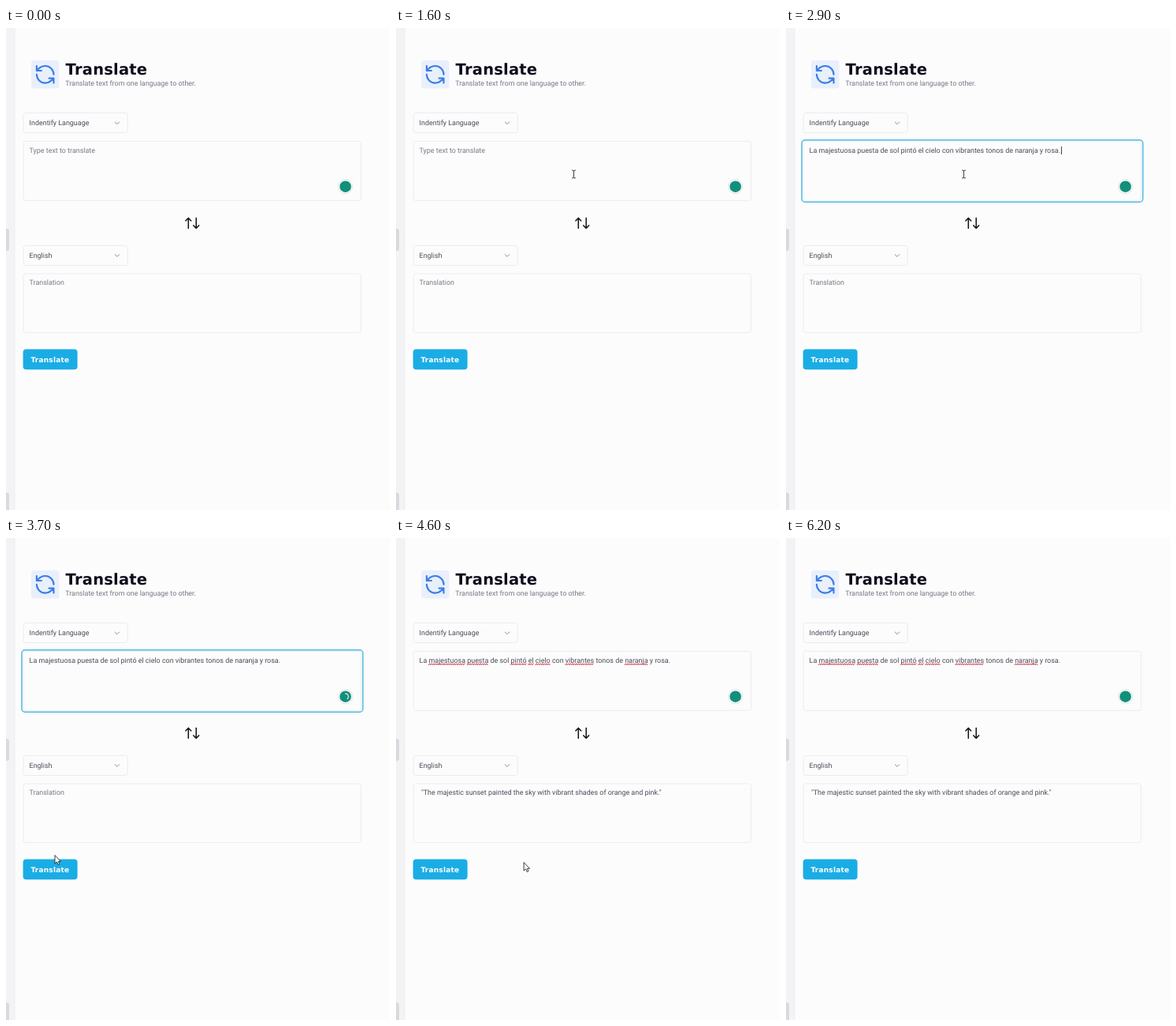
An HTML page that plays this animation: 487 by 610 pixels, repeating every 6300 ms.

```html
<!DOCTYPE html>
<html lang="en">
<head>
<meta charset="utf-8">
<title>Translate</title>
<style>
  html, body { margin: 0; width: 100%; height: 100%; overflow: hidden; background: #fcfcfd; }
  svg { display: block; width: 487px; height: 610px; }
  text { font: 8.93px Roboto, sans-serif; fill: #4b4c57; text-rendering: geometricPrecision; white-space: pre; }
  .muted { fill: #777983; }
  .wide { font-family: "DejaVu Sans", sans-serif; font-weight: bold; }
  .title { font-size: 19.5px; letter-spacing: .2px; fill: #0c0c1c; }
  .label { font-size: 9px; letter-spacing: .2px; fill: #fff; }
  .line { fill: none; stroke-linecap: round; stroke-linejoin: round; }
  .field { fill: #fcfcfd; stroke: #ebebee; stroke-width: .9; }
</style>
</head>
<body>
<svg viewBox="0 0 487 610">
  <rect width="487" height="610" fill="#fcfcfd"/>
  <rect width="11" height="610" fill="#f3f3f6"/>
  <path d="M11 0V610" stroke="#ececf0" stroke-width=".8"/>
  <rect x="-6" y="254" width="10" height="28" rx="3" fill="#d9d9de"/>
  <rect x="-6" y="588" width="10" height="30" rx="3" fill="#d9d9de"/>

  <rect x="32" y="41" width="35.5" height="35.5" rx="3.5" fill="#e9f0fc"/>
  <g class="line" transform="translate(49.7 58.8) scale(1.2)" stroke="#3c7ee8" stroke-width="1.8">
    <path id="half" d="M9 0A9 9 0 0 0 0 -9A9.75 9.75 0 0 0 -6.74 -6.26L-9 -4M-9 -9V-4H-4"/>
    <use href="#half" transform="rotate(180)"/>
  </g>
  <text class="wide title" x="75.6" y="59.4">Translate</text>
  <text class="muted" x="75.2" y="73">Translate text from one language to other.</text>

  <rect class="field" x="22" y="107.5" width="132.3" height="25" rx="3"/>
  <text x="29.6" y="123">Indentify Language</text>
  <rect class="field" x="22" y="275.5" width="132.3" height="25" rx="3"/>
  <text x="29.6" y="290.5">English</text>
  <path class="line" d="M138.3 119L141 121.7L143.7 119M138.3 286.7L141 289.4L143.7 286.7" stroke="#8b8c95"/>

  <rect class="field" x="22" y="143.3" width="428.3" height="75" rx="3"/>
  <rect id="focus" x="20" y="141.8" width="432.6" height="78.4" rx="4" fill="none" stroke="#4dbbe2" stroke-width="1.5"/>
  <text id="input" x="29.6" y="158"></text>
  <path id="squiggles" class="line" stroke="#dc3545"/>
  <path id="caret" stroke="#22232c" stroke-width=".9"/>
  <circle cx="430.5" cy="200.7" r="9" fill="#fff" stroke="#d3dfdd" stroke-width=".9"/>
  <circle cx="430.5" cy="200.7" r="7.3" fill="#128f7b"/>
  <path id="checking" class="line" d="M0 -3.8A3.8 3.8 0 0 1 2.4 2.9" stroke="#e4f4f0" stroke-width="1.1"/>

  <g class="line" stroke="#101118" stroke-width="1.5">
    <path d="M231.3 253.5V240.4M227.9 244L231.3 240.4L234.7 244"/>
    <path d="M241.2 240.4V253.5M237.8 249.9L241.2 253.5L244.6 249.9"/>
  </g>

  <rect class="field" x="22" y="311" width="428.3" height="74.5" rx="3"/>
  <text id="output" y="325.4"></text>

  <rect id="button" x="21.6" y="406.4" height="25.8" rx="4"/>
  <path id="spinner" class="line" d="M-2.8 2.8A4 4 0 1 1 2.8 2.8" stroke="#fff"/>
  <text id="label" class="wide label" y="422.6">Translate</text>

  <path id="arrow" d="M0 0V10.6L2.5 8.4L4.1 12L5.9 11.2L4.3 7.8H7.4Z" fill="#fff" stroke="#25262c" stroke-width=".9" stroke-linejoin="round"/>
  <path id="beam" class="line" d="M-2 -5Q0 -5 0 -4Q0 -5 2 -5M0 -4V4M-2 5Q0 5 0 4Q0 5 2 5" stroke="#33343c" stroke-width=".95"/>
</svg>
<script>
const LOOP = 6300, STEP = 100;
const SPANISH = 'La majestuosa puesta de sol pintó el cielo con vibrantes tonos de naranja y rosa.';
const ENGLISH = '"The majestic sunset painted the sky with vibrant shades of orange and pink."';
const FLAGGED = ['majestuosa', 'puesta', 'pintó', 'el', 'cielo', 'vibrantes', 'naranja'];
const ui = Object.fromEntries([...document.querySelectorAll('[id]')].map(el => [el.id, el]));

const easeIn = k => k * k;
const easeOut = k => 1 - (1 - k) ** 2;
const easeInOut = k => k * k * (3 - 2 * k);

// Where the pointer rests between moves
const outside = [414, 260], typing = [225.5, 185], aboveButton = [62, 401.5];
const waiting = [301, 420.5], besideButton = [113.5, 407], exit = [430.8, 314.5];
const MOVES = [
  { start: 1100, end: 1600, from: outside, to: typing, ease: easeOut },
  { start: 2900, end: 3700, from: typing, to: aboveButton, ease: easeIn },
  { start: 3700, end: 4000, from: aboveButton, to: waiting, ease: easeIn },
  { start: 4000, end: 4900, from: waiting, to: besideButton, ease: easeInOut },
  { start: 4900, end: 5600, from: besideButton, to: exit, ease: easeInOut }
];

const within = (t, from, to) => t >= from && t < to;
const show = (el, on) => el.setAttribute('visibility', on ? 'visible' : 'hidden');
const place = (el, x, y, angle = 0) => el.setAttribute('transform', `translate(${x} ${y}) rotate(${angle})`);

function write(el, text, muted) {
  if (el.textContent !== text) el.textContent = text;
  el.classList.toggle('muted', muted);
}

function underline(word) {
  const first = SPANISH.indexOf(` ${word} `) + 1;
  const left = ui.input.getStartPositionOfChar(first).x;
  const right = ui.input.getEndPositionOfChar(first + word.length - 1).x;
  let d = `M${left} 160.7`;
  for (let x = left + 1.3, up = true; x <= right; x += 1.3, up = !up) d += `L${x} ${up ? 158.9 : 160.7}`;
  return d;
}

function pointerAt(t) {
  const move = MOVES.findLast(m => t >= m.start);
  if (!move || t >= 5800) return null;
  const k = move.ease(Math.min(1, (t - move.start) / (move.end - move.start)));
  return move.from.map((v, i) => v + (move.to[i] - v) * k);
}

function drawPointer(t) {
  const point = pointerAt(t);
  const overInput = point && within(point[1], 143, 219);
  show(ui.arrow, point && !overInput);
  show(ui.beam, overInput);
  if (point) place(overInput ? ui.beam : ui.arrow, ...point);
  ui.arrow.setAttribute('opacity', t >= 5700 ? .5 : 1);
}

function drawInput(t) {
  const pasted = t >= 2900;
  show(ui.focus, within(t, 2200, 3800));
  ui.focus.setAttribute('opacity', t < 2300 ? .6 : 1);
  write(ui.input, pasted ? SPANISH : 'Type text to translate', !pasted);
  show(ui.caret, within(t, 2200, 3400));
  ui.caret.setAttribute('d', `M${pasted ? 349.4 : 29.6} 150V160`);
  show(ui.squiggles, t >= 3900);
  show(ui.checking, within(t, 3000, 3900));
  place(ui.checking, 430.5, 200.7, (t - 3700) * .36);
}

function drawResult(t) {
  const loading = within(t, 3900, 4600), done = t >= 4600;
  ui.button.setAttribute('width', loading ? 84.2 : 69);
  ui.button.setAttribute('fill', loading ? '#8bd5ef' : '#1aade5');
  ui.label.setAttribute('x', loading ? 46.8 : 31.5);
  show(ui.spinner, loading);
  place(ui.spinner, 37, 419.5, (t - 4000) * .36);
  ui.output.setAttribute('x', done ? 31.9 : 29.6);
  write(ui.output, done ? ENGLISH : 'Translation', !done);
}

function render(now) {
  const t = Math.floor(now % LOOP / STEP) * STEP;
  drawInput(t);
  drawResult(t);
  drawPointer(t);
}

write(ui.input, SPANISH, false);
ui.squiggles.setAttribute('d', FLAGGED.map(underline).join(''));

const start = performance.now();
function tick() {
  render(performance.now() - start);
  requestAnimationFrame(tick);
}
tick();
</script>
</body>
</html>
```
